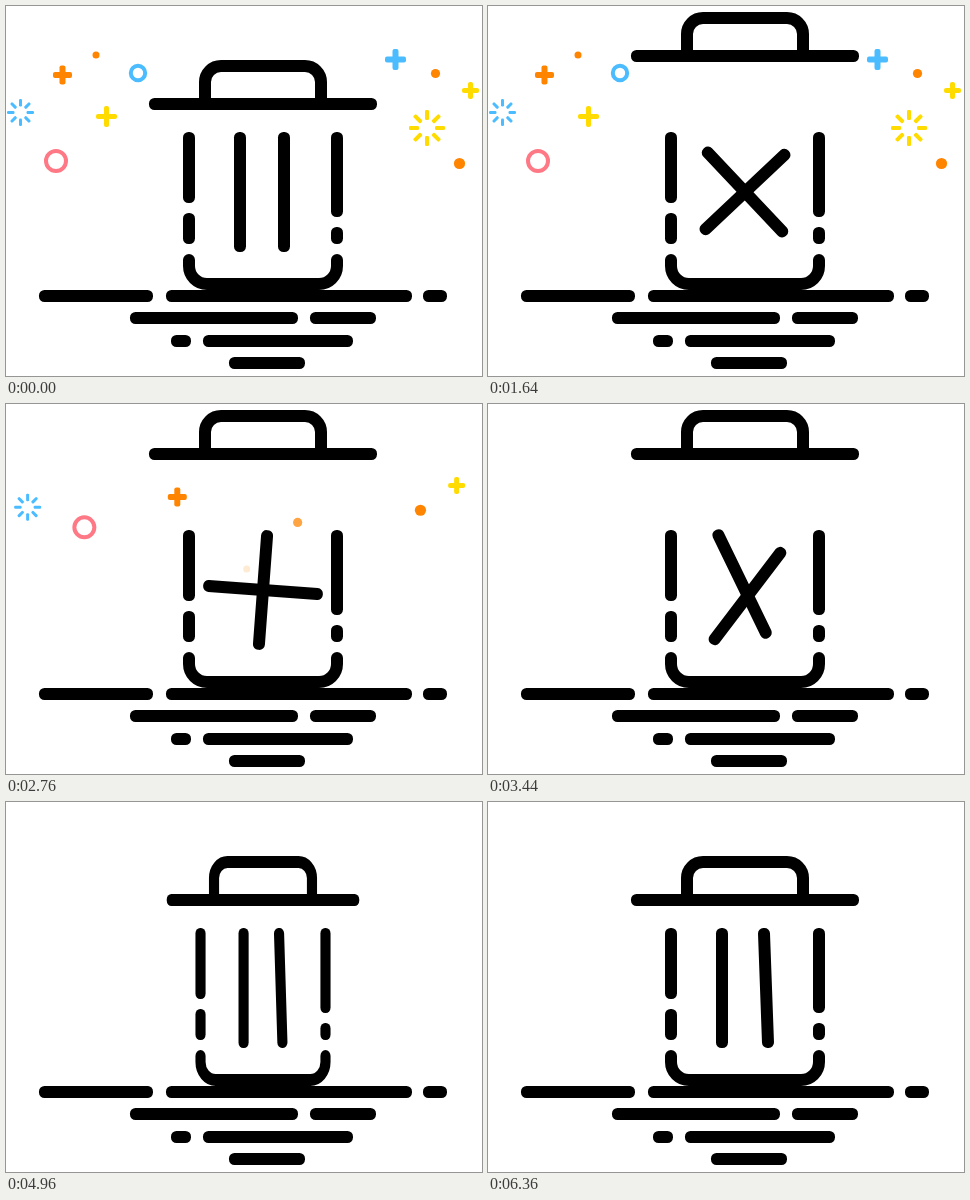
Write an HTML page that moves like this. It is 476 px wide and 370 px high and loops after 7200 ms.

```html
<!DOCTYPE html>
<html lang="en">
<head>
<meta charset="utf-8">
<title>Bin</title>
<style>
  html, body { margin: 0; width: 100%; height: 100%; overflow: hidden; background: #fff; }
  svg { display: block; width: 476px; height: 370px; }
  .tube { fill: none; stroke: #000; stroke-width: 12; }
</style>
</head>
<body>
<svg viewBox="0 0 476 370">
  <g id="confetti"></g>
  <g id="ground"></g>
  <g id="bin">
    <g id="walls">
      <path class="tube" stroke-linecap="round" d="M183 254v6a18 18 0 0 0 18 18h112a18 18 0 0 0 18-18v-6"/>
    </g>
    <g id="leftBar"></g>
    <g id="rightBar"></g>
    <g id="lid">
      <path class="tube" d="M199 98V76a16 16 0 0 1 16-16h84a16 16 0 0 1 16 16v22"/>
      <path d="M190 93q4 0 4-4h10q0 4 4 4zM306 93q4 0 4-4h10q0 4 4 4z"/>
    </g>
  </g>
</svg>
<script>
const LOOP = 7200, FRAME = 40, FLIGHT = 720;
const CENTER = 257, MIDDLE = 186, FLOOR = 284;
const BLUE = '#4abcff', ORANGE = '#ff8400', YELLOW = '#ffdb00', PINK = '#ff7885';
const $ = id => document.getElementById(id);

function add(parent, tag, attrs) {
  const node = document.createElementNS('http://www.w3.org/2000/svg', tag);
  for (const key in attrs) node.setAttribute(key, attrs[key]);
  return parent.appendChild(node);
}
const bar = (parent, x, y, width, height, rx = 5.5, fill = '#000') =>
  add(parent, 'rect', { x, y, width, height, rx, fill });

// Confetti shapes, each centred on its own origin
const dot = (r, fill) => g => add(g, 'circle', { r, fill });
const ring = (r, stroke) => g => add(g, 'circle', { r, stroke, fill: 'none', 'stroke-width': 4 });
const plus = (size, w, color) => g => {
  bar(g, -size / 2, -w / 2, size, w, 2, color);
  bar(g, -w / 2, -size / 2, w, size, 2, color);
};
const burst = (inner, outer, w, color) => g => {
  for (let a = 0; a < 360; a += 45)
    bar(g, inner, -w / 2, outer - inner, w, 1.2, color).setAttribute('transform', `rotate(${a})`);
};

// [shape, start x, y, curve control x, y, departure time]
const pieces = [
  [ring(7.2, BLUE), 132, 67, 190, 35, 1690],
  [plus(21, 6, BLUE), 389.5, 53.5, 315, 45, 1790],
  [plus(21, 5, YELLOW), 100.5, 110.5, 165, 40, 1890],
  [burst(8, 18, 4, YELLOW), 421, 122, 365, 40, 1980],
  [dot(3.5, ORANGE), 90, 49, 135, 25, 2070],
  [dot(4.6, ORANGE), 429.5, 67.5, 312, 38, 2151],
  [plus(19, 6, ORANGE), 56.5, 69, 160, 42, 2224],
  [dot(5.6, ORANGE), 453.5, 157.5, 420, 37, 2340],
  [ring(10, PINK), 50, 155, 135, 35, 2476],
  [plus(17, 5, YELLOW), 464.5, 84.5, 324, 50, 2604],
  [burst(6, 13.5, 3, BLUE), 14.5, 106.5, 160, 36, 2652]
].map(([draw, x, y, cx, cy, start]) => {
  const node = add($('confetti'), 'g', {});
  draw(node);
  return { node, x, y, cx, cy, start };
});

[[33, 284, 114], [160, 284, 246], [417, 284, 24], [124, 306, 168],
 [304, 306, 66], [165, 329, 20], [197, 329, 150], [223, 351, 76]]
  .forEach(([x, y, w]) => bar($('ground'), x, y, w, 12));
[[177, 126, 71], [177, 207, 31], [325, 126, 85], [325, 221, 17]]
  .forEach(([x, y, h]) => bar($('walls'), x, y, 12, h));
bar($('lid'), 143, 92, 228, 12);
['leftBar', 'rightBar'].forEach(id => bar($(id), -6, -60, 12, 120));

const clamp = v => Math.min(1, Math.max(0, v));
const span = (t, from, to) => clamp((t - from) / (to - from));
const ease = (t, from, to) => { const p = span(t, from, to); return p * p * (3 - 2 * p); };
const curve = (a, b, c, e) => (1 - e) ** 2 * a + 2 * e * (1 - e) * b + e * e * c;
const move = (id, value) => $(id).setAttribute('transform', value);

function drawBars(t) {
  const cross = ease(t, 400, 1200), spin = 720 * ease(t, 1600, 3200);
  const back = ease(t, 3200, 4000), swing = 4 * back * (1 - back);
  const gap = 22 * (1 - cross + back ** 1.4), drop = 8.7 * swing;
  const left = -45 * (cross - back) + spin + 13 * swing;
  const right = 45 * cross - 47.1 * back + spin + 4 * swing;
  move('leftBar', `translate(${CENTER - 1 - gap} ${MIDDLE - drop}) rotate(${left})`
    .replace(CENTER - 1 - gap, CENTER - gap - (1 - cross + back)));
  move('rightBar', `translate(${CENTER + gap - (1 - cross + back)} ${MIDDLE + drop}) rotate(${right})`);
}

function drawBin(t) {
  const lift = 48 * (ease(t, 400, 1180) - span(t, 4000, 4400) ** 2.4);
  move('lid', `translate(0 ${-lift})`);
  const turn = Math.cos(2 * Math.PI * ease(t, 4800, 5692));
  const tilt = -18 * ease(t, 5800, 5940) + 35 * ease(t, 5940, 6160) - 17 * ease(t, 6160, 6360);
  const hop = Math.abs(tilt) * 10 / 18;
  move('bin', `translate(${CENTER} ${FLOOR - hop}) rotate(${tilt}) scale(${turn} 1) translate(${-CENTER} ${-FLOOR})`);
}

function drawConfetti(t) {
  for (const { node, x, y, cx, cy, start } of pieces) {
    const p = span(t, start, start + FLIGHT), e = p * p;
    node.setAttribute('transform', `translate(${curve(x, cx, CENTER, e)} ${curve(y, cy, MIDDLE, e)})`);
    node.setAttribute('opacity', clamp((1 - p) * 5));
  }
}

function render(now) {
  // Stepped at 25 frames per second
  const t = Math.floor(((now + 5) % LOOP) / FRAME) * FRAME + 5;
  drawBars(t);
  drawBin(t);
  drawConfetti(t);
  requestAnimationFrame(render);
}
render(0);
</script>
</body>
</html>
```
